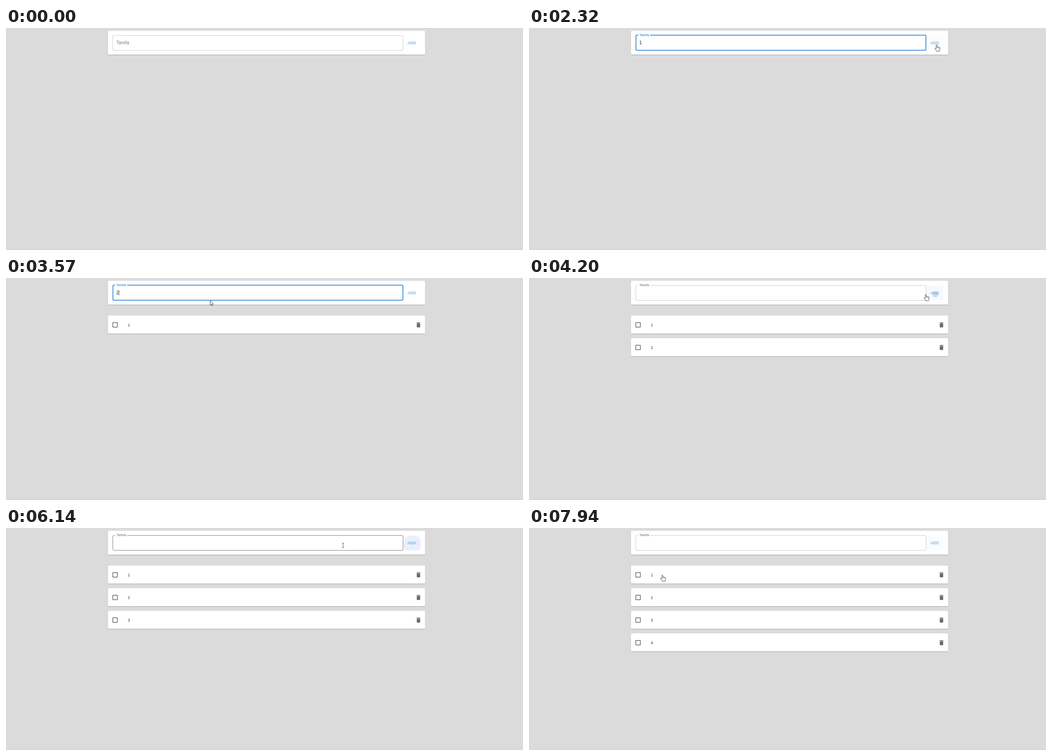
These frames come from a looping animation (1140x491 px, 8 s). An HTML page:

```html
<!DOCTYPE html>
<html lang="pt">
<head>
<meta charset="utf-8">
<title>Tarefas</title>
<style>
  html, body { margin: 0; width: 100%; height: 100%; overflow: hidden; background: #dbdbdb; }
  #stage {
    position: relative; width: 1140px; height: 491px; overflow: hidden;
    font-family: "Liberation Sans", Arial, sans-serif;
  }
  #stage::after {
    content: ""; position: absolute; left: 0; bottom: 0; width: 100%; height: 1px; background: #d0d0d0;
  }
  .card {
    position: absolute; left: 225px; width: 699px; height: 40px; border-radius: 2.5px; background: #fff;
    box-shadow: 0 1.25px .6px -.6px rgba(0,0,0,.2), 0 .6px .6px rgba(0,0,0,.14), 0 .6px 1.9px rgba(0,0,0,.12);
  }
  .form { top: 6px; height: 53px; }
  .card svg { position: absolute; top: 13px; width: 15px; height: 15px; }
  .box { left: 7.6px; fill: #4d4d52; }
  .bin { left: 677px; fill: #6b6b6d; }
  .num { position: absolute; left: 43.6px; top: 15.5px; font-size: 8.75px; line-height: 10px; color: #333; }
  #art { position: absolute; inset: 0; width: 1140px; height: 491px; }
</style>
</head>
<body>
<div id="stage">
  <div class="card form"></div>
  <svg id="art" viewBox="0 0 1140 491">
    <defs><clipPath id="btnClip"><rect x="876" y="16" width="38" height="33.5" rx="2.5"/></clipPath></defs>
    <path id="outline" fill="none"/>
    <text id="label" letter-spacing=".009em">Tarefa</text>
    <text id="value" x="243.3" y="36.4" font-size="10" fill="#222"></text>
    <rect id="caret" y="27.5" width=".8" height="11" fill="#333"/>
    <g clip-path="url(#btnClip)" fill="#1976d2">
      <rect id="hover" x="876" y="16" width="38" height="33.5"/>
      <circle id="ripple" cx="896" cy="36"/>
    </g>
    <text x="885.2" y="36.1" font-size="8.75" letter-spacing=".029em" fill="#4a94d6">ADD</text>
    <g id="cursor" fill="#fff" stroke="#2a2a2a" stroke-width=".85" stroke-linejoin="round">
      <path id="arrow" d="M0 0V10L2.3 7.9 3.9 11.4 5.4 10.7 3.9 7.3H7Z"/>
      <g id="hand">
        <path d="M-1.2 1.2C-1.2-.5 1.2-.5 1.2 1.2V5c.3-.9 2-.9 2.2.2c.4-.8 1.8-.6 2 .3c.5-.6 1.6-.2 1.6.8V9.8c0 1.5-1 2.2-1 4H-.4C-.8 12-2.2 11-3.5 8.6C-4.1 7.4-2.6 6.8-1.2 8.4Z"/>
        <path fill="none" stroke-width=".6" d="M1.2 5V7.2M3.4 5.4V7.2M5.4 5.8V7.4"/>
      </g>
      <path id="beam" fill="none" stroke-width=".8" d="M-2-5H2M0-5V5M-2 5H2"/>
    </g>
  </svg>
</div>
<script>
const LOOP = 8000, ENTER = 320;
const $ = id => document.getElementById(id);
const set = (el, attrs) => { for (const k in attrs) el.setAttribute(k, attrs[k]); };
const show = (el, on) => { el.style.display = on ? "" : "none"; };
const clamp = v => Math.max(0, Math.min(1, v));
const smooth = v => { v = clamp(v); return v * v * (3 - 2 * v); };
const mix = (a, b, k) => a + (b - a) * k;

// Every task repeats one rhythm: focus the field, type a digit, press ADD
const rounds = [1000, 3060, 4640, 6380].map((focus, i) => {
  const press = 2390 + 1665 * i;
  return { digit: i + 1, focus, press, type: press - 690, add: press + 100 };
});
const rowTop = i => Math.round(83.4 + 49.7 * i);

const pose = (t, x, y) => ({ t, x, y });
const track = [
  pose(ENTER, 480, 388),
  ...rounds.flatMap(({ focus, press }, i) => [
    pose(focus, 403 + 25 * i, 42),
    pose(focus + 480, 403 + 25 * i, 50.5),
    pose(press - 275, 914.5, 46),
    pose(press, 896, 36),
    pose(press + 145, 875, 36.5),
    pose(press + 270, 876, 37)
  ]),
  pose(LOOP - 60, 294, 104)
];

function pointer(t) {
  const i = track.findIndex(p => p.t > t);
  if (i < 0) return track[track.length - 1];
  const a = track[i - 1], b = track[i];
  const k = smooth((t - a.t) / (b.t - a.t));
  return { x: mix(a.x, b.x, k), y: mix(a.y, b.y, k) };
}

const icon = (cls, d) => `<svg class="${cls}" viewBox="0 0 24 24"><path d="${d}"/></svg>`;
const BOX = "M19 5v14H5V5h14m0-2H5c-1.1 0-2 .9-2 2v14c0 1.1.9 2 2 2h14c1.1 0 2-.9 2-2V5c0-1.1-.9-2-2-2z";
const BIN = "M6 19c0 1.1.9 2 2 2h8c1.1 0 2-.9 2-2V7H6v12zM19 4h-3.5l-1-1h-5l-1 1H5v2h14V4z";
const cards = rounds.map((r, i) => {
  const card = document.createElement("div");
  card.className = "card";
  card.style.top = rowTop(i) + "px";
  card.innerHTML = icon("box", BOX) + `<span class="num">${r.digit}</span>` + icon("bin", BIN);
  $("stage").insertBefore(card, $("art"));
  return card;
});

function drawField(t, active, hovered) {
  const first = rounds[0].focus;
  const shrink = smooth((t - first) / 200);
  const gap = 26.5 * smooth((t - first - 50) / 100);
  const w = active ? 1.5 : 1, o = w / 2;
  const l = 235 + o, r = 876 - o, top = 16 - o + (active ? 0.5 : 1), b = 50 - o;
  set($("outline"), {
    d: `M${240.5 + gap} ${top}H${r - 2.5}q2.5 0 2.5 2.5V${b - 2.5}q0 2.5-2.5 2.5H${l + 2.5}q-2.5 0-2.5-2.5V${top + 2.5}q0-2.5 2.5-2.5H240.5`,
    stroke: active ? "#1976d2" : hovered ? "#808080" : "#cbcdcd", "stroke-width": w
  });
  set($("label"), {
    x: 243.4, y: mix(36.1, 18.3, shrink), "font-size": mix(10, 7.5, shrink),
    fill: active ? "#1976d2" : t < first ? "#6c7f87" : "#666"
  });

  const typed = active && t >= active.type;
  $("value").textContent = typed ? active.digit : "";
  show($("caret"), active && (t - (typed ? active.type : active.focus)) % 1000 < 500);
  set($("caret"), { x: typed ? 248.8 : 243.2 });
}

function drawButton(t) {
  const glow = r => smooth((t - r.press + 140) / 150) * (1 - smooth((t - r.press - 300) / 300));
  set($("hover"), { opacity: 0.045 * Math.max(...rounds.map(glow)) });
  const r = rounds.find(r => t >= r.press && t < r.add + 550);
  show($("ripple"), r);
  if (r) set($("ripple"), {
    r: 29 * clamp((t - r.press) / 620),
    opacity: 0.21 * (1 - smooth((t - r.add) / 550))
  });
}

function drawCursor(t, { x, y }, inField, count) {
  show($("cursor"), t >= ENTER);
  const onButton = x >= 872 && x < 914 && y > 16 && y < 50;
  const onRow = count && y > rowTop(0) && y < rowTop(count);
  const shape = inField ? "beam" : onButton || onRow ? "hand" : "arrow";
  for (const id of ["arrow", "hand", "beam"]) show($(id), id === shape);
  set($("cursor"), { transform: `translate(${x} ${y})` });
}

const start = performance.now();
function frame() {
  const t = (performance.now() - start) % LOOP;
  const count = rounds.filter(r => t >= r.add).length;
  const spot = pointer(Math.max(t, ENTER));
  const inField = spot.x > 235 && spot.x < 872 && spot.y > 16 && spot.y < 50;
  drawField(t, rounds.find(r => t >= r.focus && t < r.press), inField);
  drawButton(t);
  cards.forEach((c, i) => show(c, i < count));
  drawCursor(t, spot, inField, count);
  requestAnimationFrame(frame);
}
frame();
</script>
</body>
</html>
```
